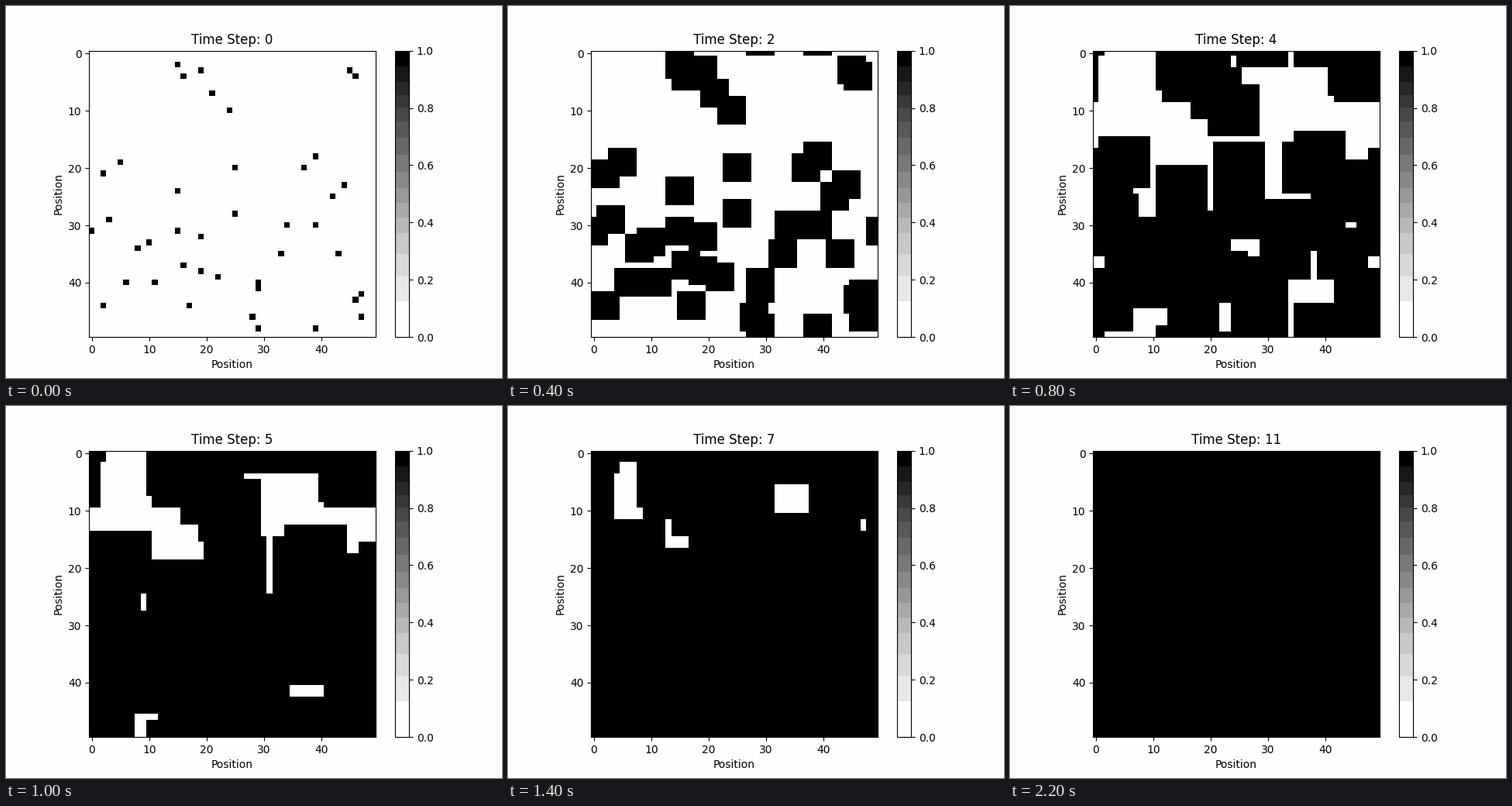
A matplotlib script that plays this animation: 640 by 480 pixels, repeating every 2.4 s.

```python
import numpy as np
import matplotlib.pyplot as plt
from matplotlib.animation import FuncAnimation
from matplotlib.colors import ListedColormap

SIZE = 50
STEPS = 12
PAPER = 254 / 255

# Cells alive at the start, counted row by row; growth does the rest
START = [
    115, 169, 195, 216, 246, 371, 524, 939, 955, 1025, 1037, 1052, 1194, 1215,
    1292, 1425, 1453, 1534, 1539, 1550, 1565, 1619, 1660, 1708, 1783, 1793,
    1866, 1919, 1972, 2006, 2011, 2029, 2079, 2147, 2196, 2202, 2217, 2328,
    2347, 2429, 2439,
]


def grow(cells):
    """Spread every live cell to its eight neighbours, wrapping at the edges."""
    for axis in (0, 1):
        cells = cells | np.roll(cells, 1, axis) | np.roll(cells, -1, axis)
    return cells


def cells_at(step):
    cells = np.zeros((SIZE, SIZE), dtype=bool)
    cells.flat[START] = True
    for _ in range(step):
        cells = grow(cells)
    return cells


def stepped_greys():
    """Greys reduced to 16 flat tones, ending in black and paper white."""
    level = plt.get_cmap("Greys")(np.arange(256), bytes=True)[:, 0] // 16
    tone = (level * 16.0 + 8) / 255
    tone[level == 0] = 0
    tone[level == 15] = PAPER
    return ListedColormap(np.column_stack([tone] * 3))


fig, ax = plt.subplots(figsize=(6.4, 4.8), dpi=100, facecolor=str(PAPER))
image = ax.imshow(cells_at(0), cmap=stepped_greys(), vmin=0, vmax=1,
                  interpolation="nearest")
fig.colorbar(image, ax=ax)
ax.set(xlabel="Position", ylabel="Position")
title = ax.set_title("")


def update(step):
    image.set_data(cells_at(step).astype(float))
    title.set_text(f"Time Step: {step}")
    return image, title


anim = FuncAnimation(fig, update, frames=STEPS, interval=200,
                     repeat=True, repeat_delay=0)
plt.show()
```
